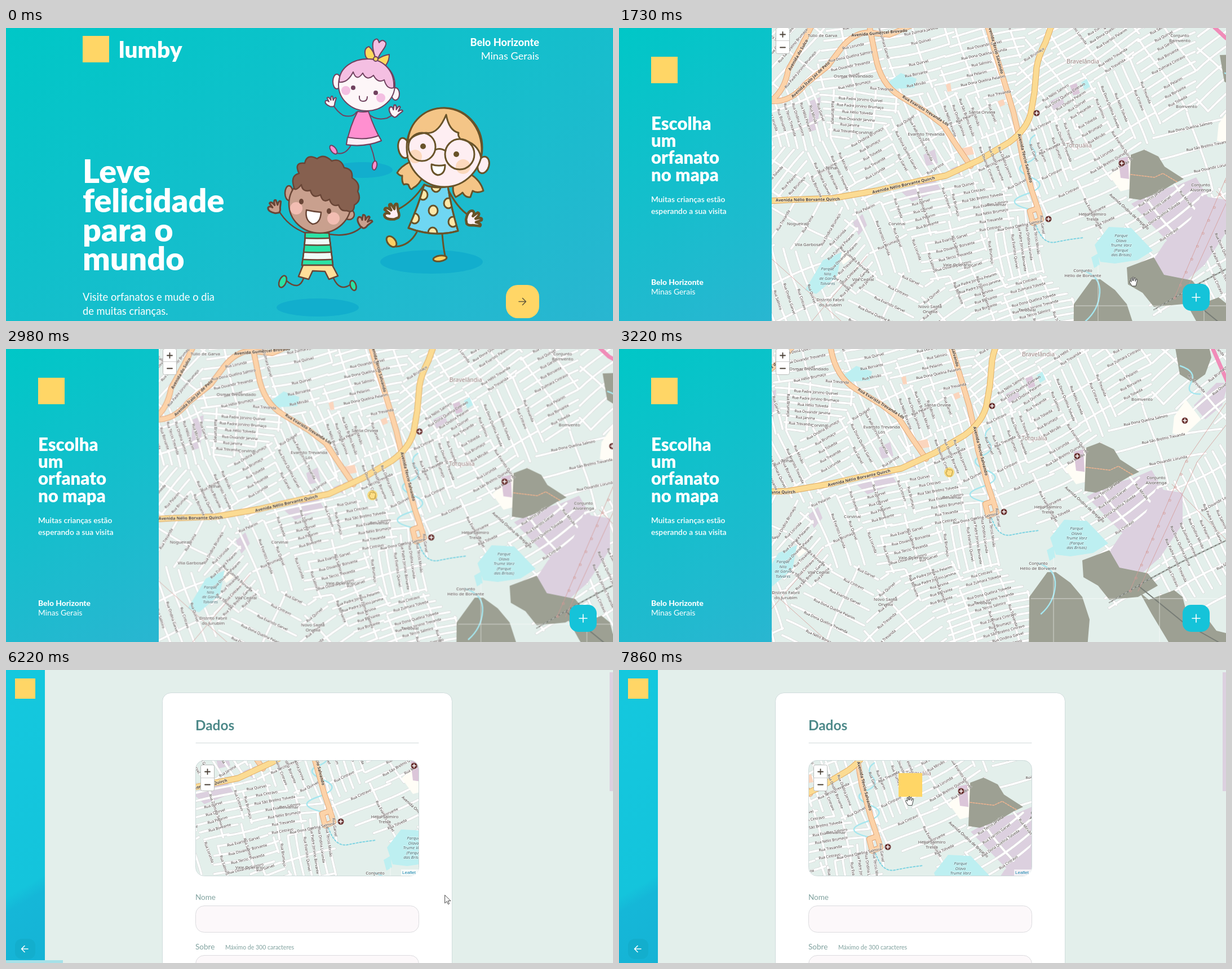
Write an HTML page with a canvas that moves like this. It is 1077 px wide and 520 px high and loops after 8 s.

```html
<!DOCTYPE html>
<html lang="pt-BR">
<head>
<meta charset="utf-8">
<title>Orfanatos</title>
<style>
html, body { margin: 0; width: 100%; height: 100%; overflow: hidden; }
canvas { display: block; width: 1077px; height: 520px; }
</style>
</head>
<body>
<canvas id="stage" width="1077" height="520"></canvas>
<script>
const LOOP = 8000, W = 1077, H = 520, RAD = Math.PI / 180;
const ctx = document.getElementById('stage').getContext('2d');
const YELLOW = '#ffd666', UI = 'Lato, sans-serif', MAP = '"Noto Sans", sans-serif';

// ---------- drawing helpers ----------
function text(str, x, y, size, weight, color, align = 'left') {
  ctx.font = `${weight} ${size}px ${UI}`;
  ctx.textAlign = align;
  ctx.textBaseline = 'alphabetic';
  ctx.fillStyle = color;
  ctx.fillText(str, x, y);
}
function lines(list, x, y, step, ...style) {
  list.forEach((s, i) => text(s, x, y + i * step, ...style));
}
function box(x, y, w, h, r, fill, border) {
  ctx.beginPath();
  ctx.roundRect(x, y, w, h, r);
  ctx.fillStyle = fill;
  ctx.fill();
  if (border) stroke(border, 1);
}
function stroke(color, width, path) {
  ctx.strokeStyle = color;
  ctx.lineWidth = width;
  path ? ctx.stroke(new Path2D(path)) : ctx.stroke();
}
function diagonal(x, w, h, stops) {
  const a = 329.54 * RAD, ux = Math.sin(a), uy = -Math.cos(a);
  const half = (Math.abs(w * ux) + Math.abs(h * uy)) / 2;
  const g = ctx.createLinearGradient(x + w / 2 + ux * half, h / 2 + uy * half, x + w / 2 - ux * half, h / 2 - uy * half);
  stops.forEach(([at, c]) => g.addColorStop(at, c));
  ctx.fillStyle = g;
  ctx.fillRect(x, 0, w, h);
}
const SEA = [[0, '#00c7c7'], [1, '#29b6d1']];
const square = (x, y, s) => box(x, y, s, s, 0, YELLOW);

// ---------- children ----------
let ink, pen;
function shape(d, fill) {
  const p = new Path2D(d);
  if (fill) { ctx.fillStyle = fill; ctx.fill(p); }
  ctx.strokeStyle = ink;
  ctx.lineWidth = pen;
  ctx.stroke(p);
}
function oval(x, y, rx, ry, fill, outline = true, deg = 0) {
  ctx.beginPath();
  ctx.ellipse(x, y, rx, ry, deg * RAD, 0, 7);
  if (fill) { ctx.fillStyle = fill; ctx.fill(); }
  if (outline) stroke(ink, pen);
}
const spot = (x, y, r, fill) => oval(x, y, r, r, fill, false);
function hand(x, y, deg, scale, fill) {
  ctx.save();
  ctx.translate(x, y);
  ctx.rotate(deg * RAD);
  ctx.scale(scale, scale);
  shape('M-3 8C-8 5-12 1-10-3Q-7-5-4-1L-6-8Q-3-11 0-3Q1-12 4-9L4-2Q8-8 10-5L6 3Q5 8 2 9Z', fill);
  ctx.restore();
}
function within(d, draw) {
  ctx.save();
  ctx.clip(new Path2D(d));
  draw();
  ctx.restore();
}

function pinkGirl() {
  ink = '#70425f'; pen = 2;
  const skin = '#fdf6f8', hair = '#f4bfe2', pink = '#ff8fd0';
  shape('M612 208Q602 226 587 222M646 207Q652 222 655 238');
  oval(581, 216, 4.5, 9, pink, true, -38);
  oval(654, 244, 4, 8, pink, true, 10);
  shape('M622 149Q615 160 598 155Q586 147 581 137M643 152Q655 165 676 160Q684 156 688 152');
  hand(577, 131, -10, 1, skin);
  hand(691, 148, 25, 1.15, skin);
  const dress = 'M624 148Q634 150 643 148Q654 180 666 200Q636 212 604 207Q610 174 624 148Z';
  shape(dress, pink);
  shape('M606 194Q640 200 661 191L666 200Q636 212 604 207Z', '#fdeef6');
  shape('M656 54C650 38 648 22 656 20Q660 18 662 26Q668 18 674 26C676 34 664 42 660 54Z', hair);
  shape('M655 55Q640 58 638 50Q634 36 644 33Q654 42 655 55ZM658 56Q670 48 680 47Q680 58 674 66Q664 66 658 58Z', '#fcd95d');
  oval(587, 95, 7, 13, skin);
  oval(691, 117, 7, 11, skin);
  oval(640, 101, 50, 46, skin);
  shape('M591 96C591 70 616 54 645 55C672 57 690 78 688 106Q676 110 671 92Q660 99 652 84Q640 95 633 80Q622 96 616 78Q606 98 591 96Z', hair);
  oval(656, 55, 4, 4, '#fcd95d');
  spot(603, 111, 8, hair); spot(665, 124, 8, hair);
  spot(616, 106, 4, ink); spot(656, 115, 4, ink);
  shape('M627 121Q626 130 634 130Q641 130 641 122');
}
function glassesGirl() {
  ink = '#685329'; pen = 3;
  const skin = '#feeef2', hair = '#f4c587', cream = '#ffe8a8';
  shape('M729 362Q716 386 692 388M774 366Q776 390 779 404');
  oval(684, 379, 11, 7, '#fcd064', true, 50);
  oval(770, 409, 12, 5, '#fcd064', true, -8);
  shape('M742 278Q722 308 697 321M782 282Q800 320 822 333');
  hand(686, 327, -35, 1.5, skin);
  hand(829, 340, 70, 1.5, skin);
  const dress = 'M742 278Q762 286 784 281Q790 320 802 360Q760 372 714 355Q732 315 742 278Z';
  shape(dress, '#6fd6f2');
  within(dress, () => [[758, 324], [740, 296], [785, 311], [725, 338], [757, 363], [793, 344], [763, 282]]
    .forEach(([x, y]) => oval(x, y, 8, 9, cream)));
  shape(dress);
  shape('M716 238Q700 246 694 257Q699 263 703 262Q702 274 706 278Q710 276 714 278Q718 290 722 284Q734 278 740 262Z', hair);
  shape('M795 272Q790 290 798 300Q806 296 810 292Q816 302 824 300Q826 294 828 289Q836 294 847 289Q842 270 822 258Z', hair);
  oval(706, 213, 10, 18, skin, true, -10);
  oval(847, 243, 10, 15, skin, true, 15);
  oval(778, 212, 67, 70, skin);
  shape('M713 203C715 165 745 141 778 142C822 144 850 185 843 230Q838 204 806 197Q801 190 803 186Q786 182 781 154Q766 190 745 186Q722 188 713 203Z', hair);
  spot(726, 228, 12, '#fcd9bd'); spot(811, 246, 13, '#fcd9bd');
  oval(738, 211, 24, 25); oval(805, 224, 26, 27);
  shape('M762 216Q770 212 780 218');
  spot(740, 210, 5, ink); spot(799, 224, 5, ink);
  shape('M755 242Q766 246 779 243Q779 260 766 261Q754 258 755 242Z', '#fff');
}
function boy() {
  ink = '#694536'; pen = 2.5;
  const skin = '#c9a08e', green = '#2be3a5';
  shape('M528 444Q520 468 497 448M581 444Q592 468 610 456');
  oval(491, 450, 6, 11, green, true, 22);
  oval(616, 457, 5, 9, green, true, -18);
  shape('M532 364Q500 352 484 324M574 366Q612 372 632 352');
  hand(478, 318, -20, 1.25, skin);
  hand(636, 344, 25, 1.25, skin);
  const shirt = 'M531 363L573 364Q577 395 580 421L525 421Q530 390 531 363Z';
  shape(shirt, '#f0fbf7');
  within(shirt, () => [[357, 15], [384, 13], [410, 15]].forEach(([y, h]) =>
    shape(`M515 ${y}Q552 ${y + 3} 590 ${y}V${y + h}Q552 ${y + h + 3} 515 ${y + h}Z`, green)));
  shape(shirt);
  shape('M527 421H579L589 440L573 446L566 432L544 431L537 446L519 441Z', '#ffdf9a');
  oval(502, 293, 7, 13, skin);
  oval(609, 331, 9, 9, skin);
  oval(557, 312, 55, 52, skin);
  shape('M512 286Q503 262 520 258Q510 238 530 240Q534 222 552 232Q564 222 578 236Q594 230 600 248Q616 250 614 266Q630 276 624 290Q632 306 618 314Q618 330 604 324Q594 326 590 314Q578 318 574 304Q562 312 558 296Q544 304 540 288Q526 292 524 278Q516 288 512 286Z', '#86604f');
  spot(515, 320, 11, '#f2bdb2'); spot(581, 338, 11, '#f2bdb2');
  oval(524, 308, 4, 5, ink, false); oval(573, 325, 4, 5, ink, false);
  shape('M533 323Q546 326 559 327Q558 347 544 348Q530 342 533 323Z', '#fff');
}

// ---------- street map, built once ----------
const MAP_X = 250, MAP_Y = -10;
// x, y, street angle, street spacing of each neighbourhood
const DISTRICTS = [
  [300, 40, -50, 20], [410, 65, -12, 17], [535, 40, -12, 18], [620, 70, -12, 15],
  [600, 165, 70, 15], [318, 175, 72, 14], [415, 150, 4, 12], [445, 225, -30, 16],
  [530, 215, 62, 16], [370, 250, 65, 16], [300, 255, -48, 15], [640, 320, -10, 14],
  [540, 325, -16, 14], [670, 240, 68, 16], [600, 385, -14, 16], [705, 400, 82, 14],
  [640, 460, -17, 13], [725, 490, -15, 12], [575, 520, -40, 22], [480, 490, 25, 28],
  [330, 350, -60, 40], [310, 440, 72, 20], [415, 410, -45, 15], [470, 385, 70, 24],
  [790, 110, -32, 13], [775, 210, 68, 14], [840, 215, -30, 16], [840, 40, -32, 14],
  [900, 120, 68, 17], [970, 90, -28, 16], [1080, 90, -40, 22], [1120, 330, 65, 17],
  [840, 325, -25, 24], [960, 330, -35, 18], [805, 400, 0, 0], [1030, 215, -12, 40]
];
const PLACES = [
  [361, 16, 'Túlio de Garva'], [416, 88, 'Osmar Trevandado'], [823, 62, 'Bravelândia', 10.5], [816, 211, 'Torquália', 10.5],
  [644, 152, 'Santa Orvina'], [545, 191, 'Evaristo Trevanda/Lós'], [435, 188, 'Corvinal'], [493, 350, 'Corvinal'],
  [377, 251, 'Telhal'], [316, 350, 'Nogueiral'], [335, 387, 'Vila Garbosa'], [433, 449, 'Vila Cedral'],
  [375, 485, 'Distrito Fabril/do Jurubim'], [552, 497, 'Novo Santa/Orvélia'], [600, 423, 'Vale Operário'], [670, 316, 'Belvamar'],
  [724, 503, 'Tardoval'], [823, 433, 'Conjunto/Hélio de Borvante'], [840, 333, 'Hélio Salmiro/Trelva'],
  [1032, 281, 'Conjunto/Alvorenga'], [995, 16, 'Conjunto/Bomvento'], [1007, 142, 'Bomvento']
];
const GIVEN = 'Dona Quelina,Evaristo,Nélio,Tércio,Ondina,Padre Jorvino,Zulmara,Hélio,São Brelmo,Osvandir'.split(',');
const FAMILY = 'Borvante,Salmiro,Trevanda,Tolveda,Brumaço,Quirvel,Jarvina,Pelarim,Garvel,Lorunda,Cintravo,Mirvão'.split(',');

function buildMap() {
  const cv = document.createElement('canvas');
  cv.width = 930; cv.height = 600;
  const m = cv.getContext('2d');
  m.translate(-MAP_X, -MAP_Y);
  m.lineJoin = m.lineCap = 'round';
  m.textAlign = 'center';
  m.textBaseline = 'middle';
  let seed = 7;
  const rnd = () => (seed = seed * 16807 % 2147483647) / 2147483647;
  const pick = a => a[Math.floor(rnd() * a.length)];
  const area = (d, color) => { m.fillStyle = color; m.fill(new Path2D(d)); };
  const line = (d, color, width, dash = []) => {
    m.setLineDash(dash);
    m.strokeStyle = color; m.lineWidth = width;
    m.stroke(d instanceof Path2D ? d : new Path2D(d));
    m.setLineDash([]);
  };
  const label = (str, x, y, deg, size, style = '', color = '#3d3432') => {
    m.save();
    m.translate(x, y);
    m.rotate(deg * RAD);
    m.font = `${style} ${size}px ${MAP}`;
    m.strokeStyle = '#ffffffa0'; m.lineWidth = 1.4;
    m.fillStyle = color;
    str.split('/').forEach((s, i) => {
      m.strokeText(s, 0, i * size * 1.15);
      m.fillText(s, 0, i * size * 1.15);
    });
    m.restore();
  };

  const woods = 'M908 225L932 216L957 228L968 246L1002 268L985 276L958 292L925 305L905 302ZM901 425L949 407L967 438L1017 448L1035 470L1000 490L949 495L929 470L903 455ZM807 490L839 446H854L880 465L901 490L914 530L909 590H806ZM1003 482L1019 495L1064 478L1079 490L1084 510L1124 530L1139 550L1180 560V590H1066L1024 520ZM1066 48L1126 46L1130 65L1119 95L1098 110L1074 95Z';
  const lakes = 'M844 385L869 353L909 355L947 395L920 412L880 418L854 415ZM330 465L362 412L395 398L387 440L350 472ZM478 96L500 80L528 90L524 106L490 108ZM820 97L830 90L836 104L826 110ZM838 407L850 400L853 420L843 426Z';
  const quarry = 'M969 380L1014 340L1032 298L1079 305V360L1039 420L999 455L959 435L948 412Z';
  const blocked = new Path2D(woods + lakes + quarry);
  const yellowRoad = 'M250 308L300 305L380 302L455 289L530 272L580 262L640 234L692 203Q724 180 731 150L737 115L741 70Q744 50 757 25L770-12';
  const peachRoad = 'M652-10L668 45L685 100L700 150L708 185L716 230L733 290L743 320L749 340L734 346L729 325L743 320M443-10L455 50Q464 100 499 121L545 149L575 172L600 210L624 245';
  const canalRoad = 'M345-10L322 35L300 75Q294 110 271 128M271 130Q305 132 330 100L370 68L395 35Q415 10 440 8L480 12L527-8';
  const avenues = new Path2D(yellowRoad + peachRoad + canalRoad);

  // collect streets and their names
  const streets = new Path2D(), names = [];
  const nearest = (x, y) => {
    let best = 0, min = Infinity;
    DISTRICTS.forEach(([dx, dy], i) => {
      const d = (x - dx) ** 2 + (y - dy) ** 2;
      if (d < min) { min = d; best = i; }
    });
    return best;
  };
  function family(id, deg, gap, isMain) {
    const [cx, cy] = DISTRICTS[id], c = Math.cos(deg * RAD), s = Math.sin(deg * RAD);
    const n = Math.ceil(130 / gap);
    for (let k = -n; k <= n; k++) {
      let run = [];
      for (let u = -140; u <= 140; u += 4) {
        const v = k * gap + 3.5 * Math.sin(u / 38 + id);
        const x = cx + u * c - v * s, y = cy + u * s + v * c;
        if (u < 140 && nearest(x, y) === id) { run.push([x, y]); continue; }
        if (run.length > 4) {
          run.forEach(([px, py], i) => i ? streets.lineTo(px, py) : streets.moveTo(px, py));
          if (isMain || rnd() < .6) names.push([...run[run.length >> 1], deg, run.length * 4]);
        }
        run = [];
      }
    }
  }
  DISTRICTS.forEach(([, , deg, gap], id) => {
    if (!gap) return;
    family(id, deg, gap, true);
    family(id, deg + 86, gap * 3.1, false);
  });

  m.fillStyle = '#e3efeb';
  m.fillRect(MAP_X, MAP_Y, cv.width, cv.height);
  area('M909 312L949 290L989 280L1024 265L1045 300L1014 340L975 380ZM498 288L560 268L572 288L520 308ZM338 130L358 122L352 180L336 185ZM415 345L432 330L440 350L425 368ZM1099 150L1139 110H1160L1149 150L1119 175ZM540 225L560 215L566 240L545 245ZM765 130L785 120L792 138L772 148ZM588 250L612 240L606 262Z', '#dcd0df');
  line(streets, '#d3d1d2', 4.8);
  line(streets, '#fff', 3.7);
  area('M870 262L908 225L909 285L890 290ZM1064 170L1085 140L1112 175L1080 205L1061 200ZM388 405L402 396L413 408L398 420Z', '#fffdf6');
  area(quarry, '#dcd0df');
  area(woods, '#9da093');
  area(lakes, '#bdeff1');
  area('M886 232L903 228L905 268L890 266ZM800 102L812 98L818 116L806 120Z', '#dbc6d9');
  area('M605 214L626 210L630 224L608 228ZM672 130L682 126L685 136L676 140ZM580 100L588 98L590 112L583 113Z', '#fbd5bd');
  line('M738 190Q722 200 735 215T722 240T731 265T722 295T730 322M822 430Q855 440 853 470T828 520M1075 80Q1105 90 1094 110T1110 130', '#a6e6ee', 2.5);
  line('M740 350Q752 385 775 380T825 372', '#7fd4e2', 2, [3, 3]);
  line('M908 260L950 265L965 258L990 273', '#f3b48f', 1.5, [3, 2]);
  line('M949 500L1017 460L1077 428L1160 388M1000 470L1080 535L1160 580', '#777c76', 2);
  line('M949 500L1017 460L1077 428L1160 388', '#dcdcdc', 1, [4, 4]);
  line('M985 480L1084 250L1160 140M1000 480L1105 250L1160 180M1060 290L1160 392M271 410L450 570M300 570L440 405', '#d59a96', .8);
  for (let i = 0; i < 11; i++) m.strokeRect(985 + i * 10, 478 - i * 23, 3, 3);
  line('M1045-12L1077 18L1132 48L1160 112', '#f08cb8', 7);
  line(canalRoad + peachRoad, '#e0a172', 10);
  line(canalRoad + peachRoad, '#fcd3a9', 8.2);
  line(yellowRoad, '#dfa85f', 11);
  line(yellowRoad, '#fbdb93', 9.2);
  line('M810 493H1180M850 420V590M1038 480V590', '#ffffff90', 1);

  ctx.lineWidth = 18;
  for (const [x, y, deg, room] of names) {
    if (ctx.isPointInPath(blocked, x, y) || ctx.isPointInStroke(avenues, x, y)) continue;
    const short = 'Rua ' + pick(FAMILY), long = `Rua ${pick(GIVEN)} ${pick(FAMILY)}`;
    const name = room > 88 && rnd() < .7 ? long : room > 42 ? short : '';
    if (name && rnd() < .8) label(name, x, y, deg > 90 ? deg - 180 : deg, 6.5);
  }
  const avenue = (str, x, y, deg) => label(str, x, y, deg, 7.4, '600', '#4b3b2c');
  avenue('Avenida Nélio Borvante Quirch', 335, 305, -1);
  avenue('Avenida Nélio Borvante Quirch', 505, 279, -13);
  avenue('Avenida Tércio Salvando', 668, 38, 75);
  avenue('Avenida Tércio Salvando', 720, 231, 76);
  avenue('Rua Evaristo Trevanda Lós', 544, 147, 32);
  avenue('Avenida Gumercel Brovado', 462, 9, -5);
  avenue('Avenida Ítalo Jaz de Pelo', 340, 92, -43);
  avenue('Avenida do Sulco', 318, 48, -60);
  label('Avenida Ondina de Brejarvo', 905, 326, 42, 7);
  PLACES.forEach(([x, y, str, size = 7.8]) => label(str, x, y - 2, 0, size, '', size > 8 ? '#98817f' : '#4f4846'));
  label('Parque/Olavo/Trume Varz/(Parque/das Brisas)', 891, 369, 0, 7.4, 'italic', '#37646b');
  label('Parque/Nilo/de Garva/Tolvares', 370, 428, 0, 7.4, 'italic', '#37646b');
  for (const [x, y] of [[741, 151], [762, 339], [892, 240], [1083, 177]]) {
    m.beginPath(); m.arc(x, y, 5.5, 0, 7);
    m.fillStyle = '#6b3533'; m.fill();
    line(`M${x - 3} ${y}h6M${x} ${y - 3}v6`, '#fff', 1.6);
  }
  return cv;
}
const mapImage = buildMap();

function showMap(x, y, w, h, r, dx, dy) {
  ctx.save();
  ctx.beginPath();
  ctx.roundRect(x, y, w, h, r);
  ctx.clip();
  ctx.drawImage(mapImage, MAP_X + dx, MAP_Y + dy);
  ctx.restore();
}
function zoomControl(x, y) {
  box(x - .5, y - .5, 24, 46, 3, '#fff', '#b9bdbb');
  stroke('#ccc', 1, `M${x} ${y + 22.5}h23`);
  stroke('#4a4037', 1.8, `M${x + 7} ${y + 11.5}h9m-4.5-4.5v9M${x + 7} ${y + 34.5}h9`);
}

// ---------- motion ----------
const progress = (t, a, b) => {
  const p = Math.min(1, Math.max(0, (t - a) / (b - a)));
  return p * p * (3 - 2 * p);
};
const TO_MAP = 1500, TO_FORM = 6000;
// time, x, y, pointer kind used from then on
const TRACK = [
  [450, 992, 315, 'arrow'], [850, 940, 450, 'arrow'], [900, 930, 465, 'point'], [1220, 917, 482, 'point'],
  [1500, 917, 482, 'open'], [1800, 912, 440, 'open'], [2040, 886, 363, 'open'], [2140, 807, 228, 'open'], [2270, 807, 228, 'open'],
  [2880, 671, 271, 'open'], [2930, 665, 269, 'closed'], [3200, 586, 219, 'closed'], [3270, 586, 219, 'open'], [3710, 612, 203, 'open'],
  [3960, 687, 176, 'open'], [5400, 687, 176, 'open'], [5450, 703, 186, 'open'], [5750, 1010, 455, 'point'],
  [5850, 1022, 472, 'point'], [6000, 1022, 472, 'arrow'], [6220, 779, 400, 'arrow'], [6600, 640, 300, 'open'],
  [6970, 556, 235, 'open'], [7100, 556, 235, 'closed'], [7400, 439, 280, 'closed'], [7450, 439, 280, 'open'],
  [7700, 516, 232, 'open'], [8000, 516, 232, 'open']
];
const CURSORS = {
  arrow: 'M0 0V14L3.5 11L6 16L8 15L5.5 10H10Z',
  point: 'M-1.5 1Q0-1 1.5 1V7Q4 6 5 8Q8 8 8 10L7 16L5 18H-1L-6 11Q-6 9-4 9.5L-1.5 12Z',
  open: 'M-3 8L-7 2Q-8-1-6-1L-4 1L-5-5Q-4-7-3-5L-2-1V-7Q-1-9 0-7V-1L1.5-6Q3-8 3.5-5L3 0L5-4Q7-4 6.5-2L5 4L4 8Z',
  closed: 'M-3 6L-6 1Q-6-1-4-1Q-5-5-3-5Q-1-6 0-4Q2-6 3-4Q6-5 5.5-1L4 6Z'
};
const CLICKS = [[1320, 1420], [2920, 3270], [4190, 4270], [5870, 5960], [7110, 7420], [7730, 7790]];

function cursor(t) {
  const i = TRACK.findLastIndex(k => k[0] <= t);
  if (i < 0) return;
  const [t0, x0, y0, kind] = TRACK[i], [t1, x1, y1] = TRACK[i + 1] || TRACK[i];
  const p = t1 > t0 ? (t - t0) / (t1 - t0) : 0;
  const x = x0 + (x1 - x0) * p, y = y0 + (y1 - y0) * p;
  ctx.save();
  ctx.translate(x, y);
  ctx.fillStyle = '#fff';
  ctx.fill(new Path2D(CURSORS[kind]));
  stroke('#333', .9, CURSORS[kind]);
  ctx.restore();
  if (CLICKS.some(([a, b]) => t >= a && t < b)) spot(x, y, 9, '#ffc83499');
}
const statusBar = () => box(0, 515, 101, 5, 0, '#a5e1e8');

// ---------- pages ----------
function landing(t) {
  diagonal(0, W, H, SEA);
  square(136, 14, 47);
  text('lumby', 200, 53, 40.5, 900, '#fff');
  text('Belo Horizonte', 946, 32, 18.2, 800, '#fff', 'right');
  text('Minas Gerais', 946, 56, 18.2, 400, '#fff', 'right');
  lines(['Leve', 'felicidade', 'para o', 'mundo'], 136, 275, 51.8, 57.4, 900, '#fff');
  lines(['Visite orfanatos e mude o dia', 'de muitas crianças.'], 136, 484, 25, 18.3, 400, '#fff');
  const shade = '#12aecd';
  oval(632, 252, 54, 14, shade, false);
  oval(755, 415, 91, 21, shade, false);
  oval(553, 496, 73, 16, shade, false);
  pinkGirl();
  glassesGirl();
  boy();
  const hover = progress(t, 900, 1100), mix = (a, b) => Math.round(a + (b - a) * hover);
  box(887, 456, 59, 59, 21, `rgb(${mix(255, 182)},${mix(214, 238)},${mix(102, 238)})`);
  stroke('#665a3c', 1.6, 'M910 485.5H922M916.5 479.5L922.5 485.5L916.5 491.5');
  if (t >= 900) statusBar();
}
function mapPage(t) {
  const p = progress(t, 2930, 3200);
  showMap(271, 0, W - 271, H, 0, -79 * p, -50 * p);
  diagonal(0, 271, H, SEA);
  square(57, 51, 47);
  lines(['Escolha', 'um', 'orfanato', 'no mapa'], 57, 180.5, 30.4, 31.2, 900, '#fff');
  lines(['Muitas crianças estão', 'esperando a sua visita'], 57, 309, 20.5, 13.8, 600, '#fff');
  text('Belo Horizonte', 57, 456, 13.8, 800, '#fff');
  text('Minas Gerais', 57, 473, 13.8, 400, '#fff');
  zoomControl(279, 0);
  const hover = t >= 5750;
  box(1000, 454, 48, 48, 15, hover ? '#17d6eb' : '#15c3d9');
  stroke('#fff', 1.6, 'M1017 478H1031M1024 471V485');
  if (hover) statusBar();
}
function formPage(t) {
  ctx.fillStyle = '#e3efeb';
  ctx.fillRect(0, 0, W, H);
  diagonal(0, 69, H, [[0, '#14c8de'], [.72, '#14c4dc'], [.77, '#15b7d8'], [1, '#15b3d5']]);
  square(16, 15, 36);
  box(16, 477, 36, 36, 12, '#13aecd');
  stroke('#fff', 1.6, 'M39 495H28M33 489.5L27.5 495L33 500.5');
  box(1071, 4, 6, 211, 0, '#dcd0df');
  box(277.5, 40.5, 514, 520, 15, '#fff', '#d0dcdc');
  text('Dados', 336, 107, 24.4, 700, '#4d8989');
  stroke('#d0d8d9', 1, 'M337 129.5H732');
  const p = progress(t, 7110, 7400);
  showMap(337, 160, 395, 205, 15, -168 - 117 * p, -70 + 45 * p);
  ctx.beginPath();
  ctx.roundRect(336.5, 160.5, 396, 205, 15);
  stroke('#cddada', 1);
  zoomControl(346, 169);
  box(701, 354, 31, 11, [0, 0, 11, 0], '#ffffffb8');
  ctx.font = '8px "Liberation Sans", Arial, sans-serif';
  ctx.fillStyle = '#1583ad';
  ctx.fillText('Leaflet', 703, 362);
  if (t >= 7790) square(496, 183, 42);
  const label = '#81a29f', field = '#fcf8fa', edge = '#dcdcdf';
  text('Nome', 336, 408, 13.5, 400, label);
  box(336.5, 418.5, 396, 47, 15, field, edge);
  text('Sobre', 336, 496, 13.5, 400, label);
  text('Máximo de 300 caracteres', 389, 496, 10.5, 400, label);
  box(336.5, 506.5, 396, 80, 15, field, edge);
  if (t < 6300) statusBar();
}

function render() {
  const t = performance.now() % LOOP;
  ctx.lineCap = ctx.lineJoin = 'round';
  (t < TO_MAP ? landing : t < TO_FORM ? mapPage : formPage)(t);
  cursor(t);
  requestAnimationFrame(render);
}
render();
</script>
</body>
</html>
```
